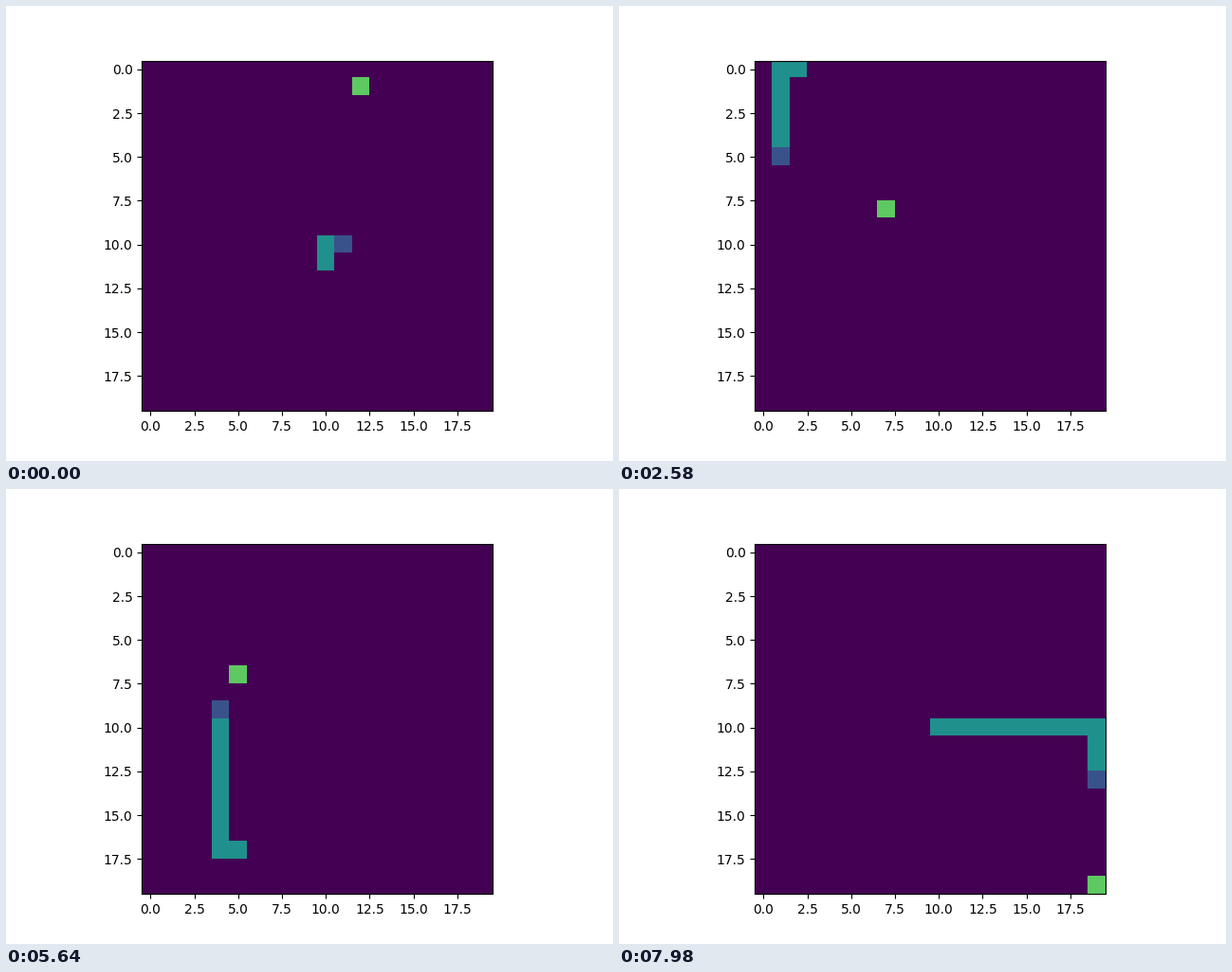
These frames come from a looping animation (640x480 px, 8000 ms). A matplotlib script:

```python
import matplotlib.pyplot as plt
import numpy as np
from matplotlib.animation import FuncAnimation

SIZE = 20
TICK, STEP, LOOP = 20, 60, 8000     # ms per drawn frame, per move, per loop
HEAD, BODY, FOOD = 1, 2, 3

# Key points (x, y): the snake's whole route follows from them.
MEALS = [(12, 1), (3, 3), (9, 3), (1, 0), (7, 8), (18, 8),
         (4, 17), (5, 7), (6, 17), (5, 10), (19, 19)]


def steer(head, heading, food):
    """Keep going while it brings the food closer, otherwise turn towards it."""
    gap = np.subtract(food, head)
    if gap @ heading > 0:
        return heading
    return np.sign(gap) * (heading == 0)


def board(snake, food):
    grid = np.zeros((SIZE, SIZE))
    grid[food[::-1]] = FOOD
    for cell in snake:
        grid[cell[::-1]] = BODY
    grid[snake[0][::-1]] = HEAD
    return grid


def play(moves):
    mid = SIZE // 2
    snake = [(mid + 1, mid), (mid, mid), (mid, mid + 1)]
    heading = np.array([1, 0])
    meals = iter(MEALS)
    food = next(meals)
    yield board(snake, food)
    for _ in range(moves):
        heading = steer(snake[0], heading, food)
        snake.insert(0, tuple(snake[0] + heading))
        if snake[0] == food:
            food = next(meals)
        else:
            snake.pop()
        yield board(snake, food)


boards = list(play((LOOP - 1) // STEP))

fig, ax = plt.subplots(figsize=(6.4, 4.8), dpi=100)
image = ax.imshow(boards[0], cmap="viridis", vmin=0, vmax=4,
                  interpolation="nearest")
ax.tick_params(axis="y", pad=3.45)


def update(frame):
    image.set_data(boards[frame * TICK // STEP])
    return [image]


anim = FuncAnimation(fig, update, frames=LOOP // TICK, interval=TICK,
                     repeat=True, repeat_delay=0)
plt.show()
```
